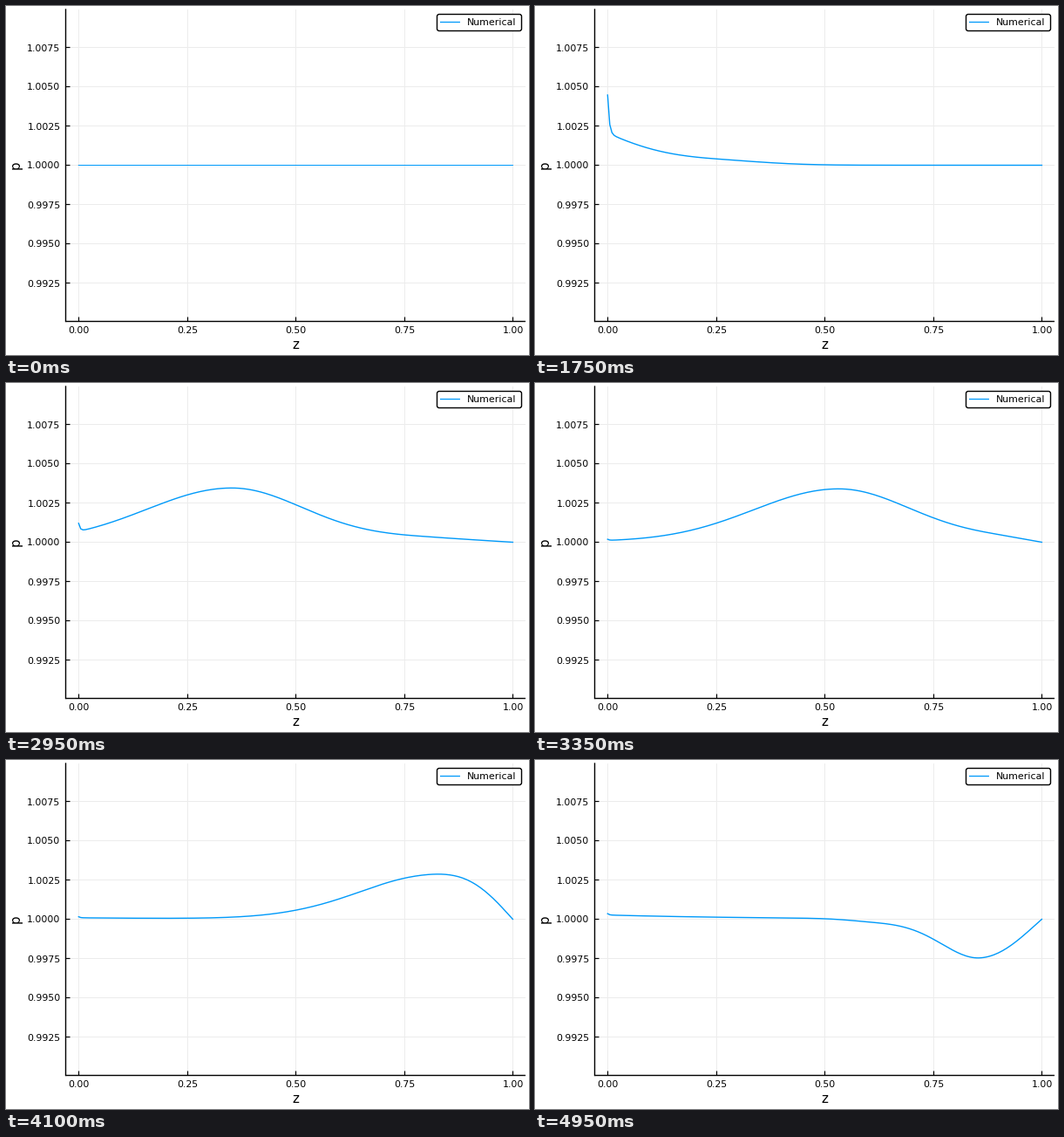
A matplotlib script for the animation above (5 s loop, 600 by 400 pixels).

```python
import numpy as np
import matplotlib.pyplot as plt
from matplotlib.animation import FuncAnimation
from matplotlib.patches import FancyBboxPatch

W, H, DPI = 600, 400, 100
FRAMES, INTERVAL = 100, 50
PX = 72 / DPI                      # points per pixel

LEFT, RIGHT, TOP, BOTTOM = 68.5, 596, 4, 361.5
Z0, Z_SPAN = 83.3, 498.1
P_MID, P_STEP = 182.5, 44.84       # pixel row of p = 1, pixels per 0.0025
BLUE, GRID = "#009AFA", "#ececec"

SPEED = 0.0224                     # distance travelled per frame
z = np.linspace(0, 1, 201)


def bell(t, centre, rise, fall):
    width = np.where(t < centre, rise, fall)
    return np.exp(-((t - centre) / width) ** 2 / 2)


def inlet(t):
    """Pressure rise entering at z = 0, in units of 0.001."""
    return (3.55 * bell(t, 43.2, 7.4, 8.66)
            + 0.3 * bell(t, 24.5, 5.4, 8)
            + 0.27 * np.exp((t - 99) / 16))


def pressure(frame):
    """Incoming wave, inverted slower reflection and thin inlet layer."""
    incoming = inlet(frame - z / SPEED) * np.exp(-0.09 * z)
    back = 1 - z
    ratio = np.interp(frame, [82, 99], [0.6, 0.56])
    delay = (1 + back / ratio) / SPEED
    reflected = inlet(frame - delay) * np.exp(-0.09 - 0.8 * back)
    layer = np.interp(inlet(frame), [0, 0.1, 0.4, 2.1, 3.55],
                      [0, 0.07, 0.1, 2.5, 3.8])
    return incoming - reflected + layer * np.exp(-z / 0.0036)


fig = plt.figure(figsize=(W / DPI, H / DPI), dpi=DPI, facecolor="white")
ax = fig.add_axes([0, 0, 1, 1])
ax.set_xlim(0, W)
ax.set_ylim(H, 0)
ax.axis("off")
plt.rcParams["font.family"] = "DejaVu Sans"


def line(xs, ys, color="black", width=1.0, order=2, cap="butt"):
    return ax.plot(xs, ys, color=color, lw=width * PX, zorder=order,
                   solid_capstyle=cap, snap=False)[0]


def label(x, y, text, size=11, **kw):
    kw.setdefault("ha", "center")
    ax.text(x, y, text, fontsize=size * PX, va="baseline", zorder=6, **kw)


for value in np.linspace(0, 1, 5):
    x = np.floor(Z0 + value * Z_SPAN + 0.5) + 0.5
    line([x, x], [TOP, BOTTOM], GRID, order=1)
    line([x, x], [BOTTOM, BOTTOM - 5], width=1.2)
    label(x, 375, f"{value:.2f}")

for k in range(-3, 4):
    y = np.floor(P_MID - k * P_STEP) + 0.5
    line([LEFT, RIGHT], [y, y], GRID, order=1)
    line([LEFT, LEFT + 5], [y, y], width=1.2)
    label(62.5, y + 4, f"{1 + 0.0025 * k:.4f}", ha="right")

line([LEFT, LEFT], [TOP, BOTTOM], width=1.4, cap="projecting")
line([LEFT, RIGHT], [BOTTOM, BOTTOM], width=1.4)
label(332.5, 393, "z", 15)
label(15.5, P_MID, "p", 15, rotation=90, rotation_mode="anchor")

ax.add_patch(FancyBboxPatch((494.5, 9.5), 97, 19,
                            boxstyle="round,pad=0,rounding_size=2.5",
                            fc="white", ec="black", lw=1.4 * PX, zorder=4))
line([498, 521], [18.5, 18.5], BLUE, 1.3, 5)
label(529, 22.5, "Numerical", ha="left")

curve = line(Z0 + z * Z_SPAN, np.full_like(z, P_MID), BLUE, 1.4, 3, "projecting")


def update(frame):
    at_rest = frame < 7
    rise = np.zeros_like(z) if at_rest else pressure(frame)
    curve.set_ydata(P_MID - rise * P_STEP / 2.5)
    curve.set_linewidth((1.0 if at_rest else 1.4) * PX)
    return (curve,)


anim = FuncAnimation(fig, update, frames=FRAMES, interval=INTERVAL,
                     repeat=True, repeat_delay=0, blit=False)
plt.show()
```
